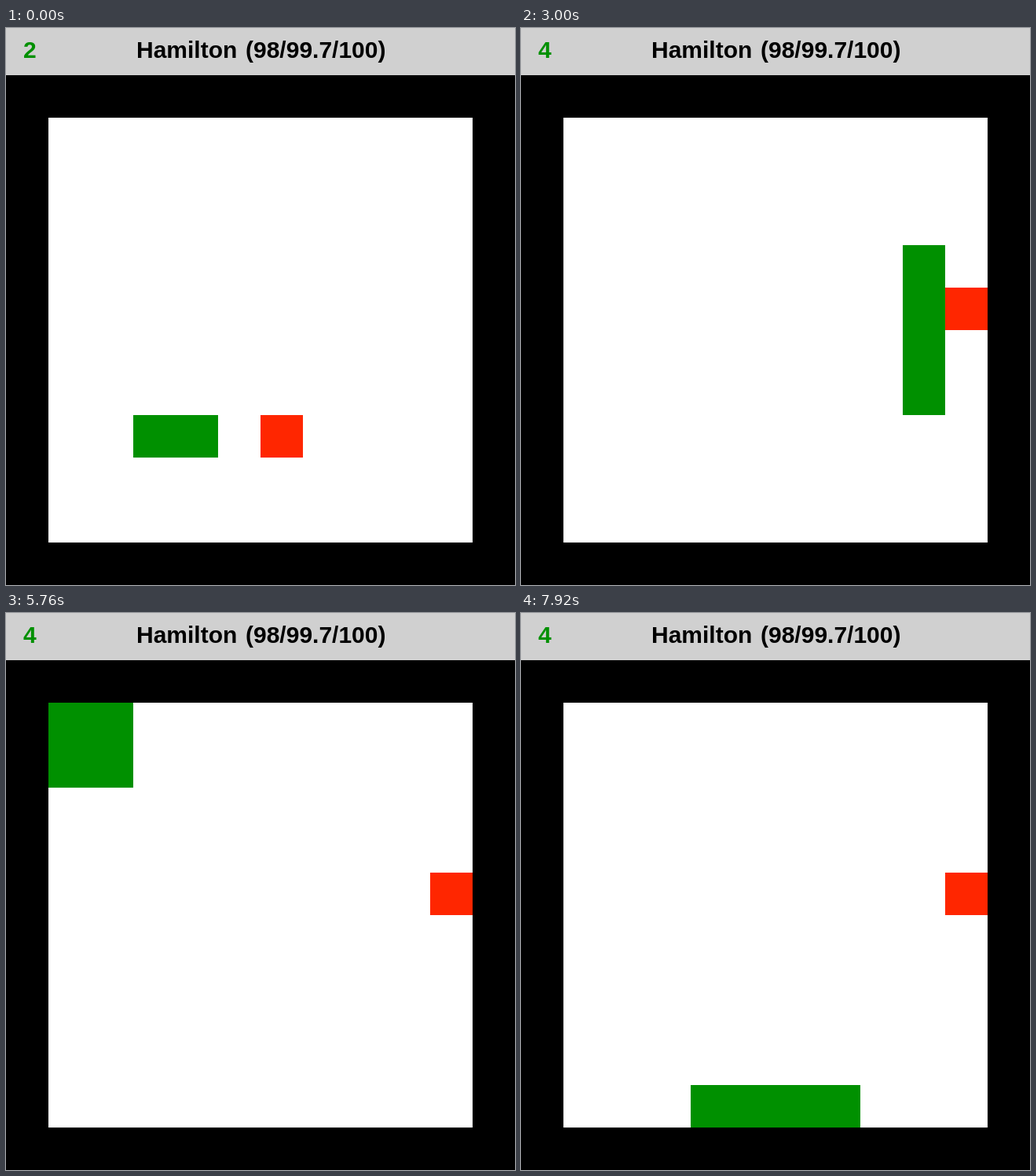
Recreate the animation shown at these times as an HTML page with a canvas. Size 648 px wide and 708 px high, loop 8000 ms.

```html
<!DOCTYPE html>
<html>
<head>
<meta charset="utf-8">
<style>
  html, body { margin: 0; overflow: hidden; background: #000; }
  canvas { display: block; }
</style>
</head>
<body>
<canvas id="stage" width="648" height="708"></canvas>
<script>
const ctx = document.getElementById('stage').getContext('2d');
const LOOP = 8000, TICK = 60, MOVE = 109.2, PHASE = 0.74;
const CELL = 54, LEFT = 54, TOP = 114;
const GREEN = '#009000', RED = '#ff2600';

// Route of the head as direction + run length, starting at the first tail cell.
const ROUTE = 'R5 U5 L1 D4 L1 U5 R3 D7 L7 U3 R2 U5 L1 D1 L1 U1 L1 D3 R1 U1 R1 D2 L2 D5 R6';
const STEP = { R: [1, 0], L: [-1, 0], U: [0, -1], D: [0, 1] };

const path = [[2, 7]];
for (const [dir, count] of ROUTE.split(' ')) {
  const [dx, dy] = STEP[dir];
  for (let i = 0; i < +count; i++) {
    const [x, y] = path[path.length - 1];
    path.push([x + dx, y + dy]);
  }
}

// Each meal begins at a move number and sets the food cell and snake length.
const MEALS = [
  { from: 0, food: [5, 7], length: 2 },
  { from: 3, food: [7, 3], length: 3 },
  { from: 9, food: [9, 4], length: 4 },
];

function rect(color, x, y, w, h) {
  ctx.fillStyle = color;
  ctx.fillRect(x, y, w, h);
}

function cell([x, y], color) {
  rect(color, LEFT + x * CELL, TOP + y * CELL, CELL, CELL);
}

function label(text, x, color) {
  ctx.fillStyle = color;
  ctx.fillText(text, x, 38);
}

function draw(time) {
  const shown = Math.floor(time / TICK) * TICK;
  const move = Math.floor(shown / MOVE + PHASE);
  const { food, length } = MEALS.filter(meal => meal.from <= move).pop();
  const head = Math.min(move + 1, path.length - 1);

  rect('#000', 0, 0, 648, 708);
  rect('#d0d0d0', 0, 0, 648, 60);
  rect('#fff', LEFT, TOP, 10 * CELL, 10 * CELL);

  ctx.font = 'bold 30px "Liberation Sans", Arial, sans-serif';
  label(length, 22, GREEN);
  label('Hamilton', 166, '#000');
  label('(98/99.7/100)', 305, '#000');

  cell(food, RED);
  path.slice(head - length + 1, head + 1).forEach(part => cell(part, GREEN));
}

const start = performance.now();
function frame() {
  draw((performance.now() - start) % LOOP);
  requestAnimationFrame(frame);
}
frame();
</script>
</body>
</html>
```
